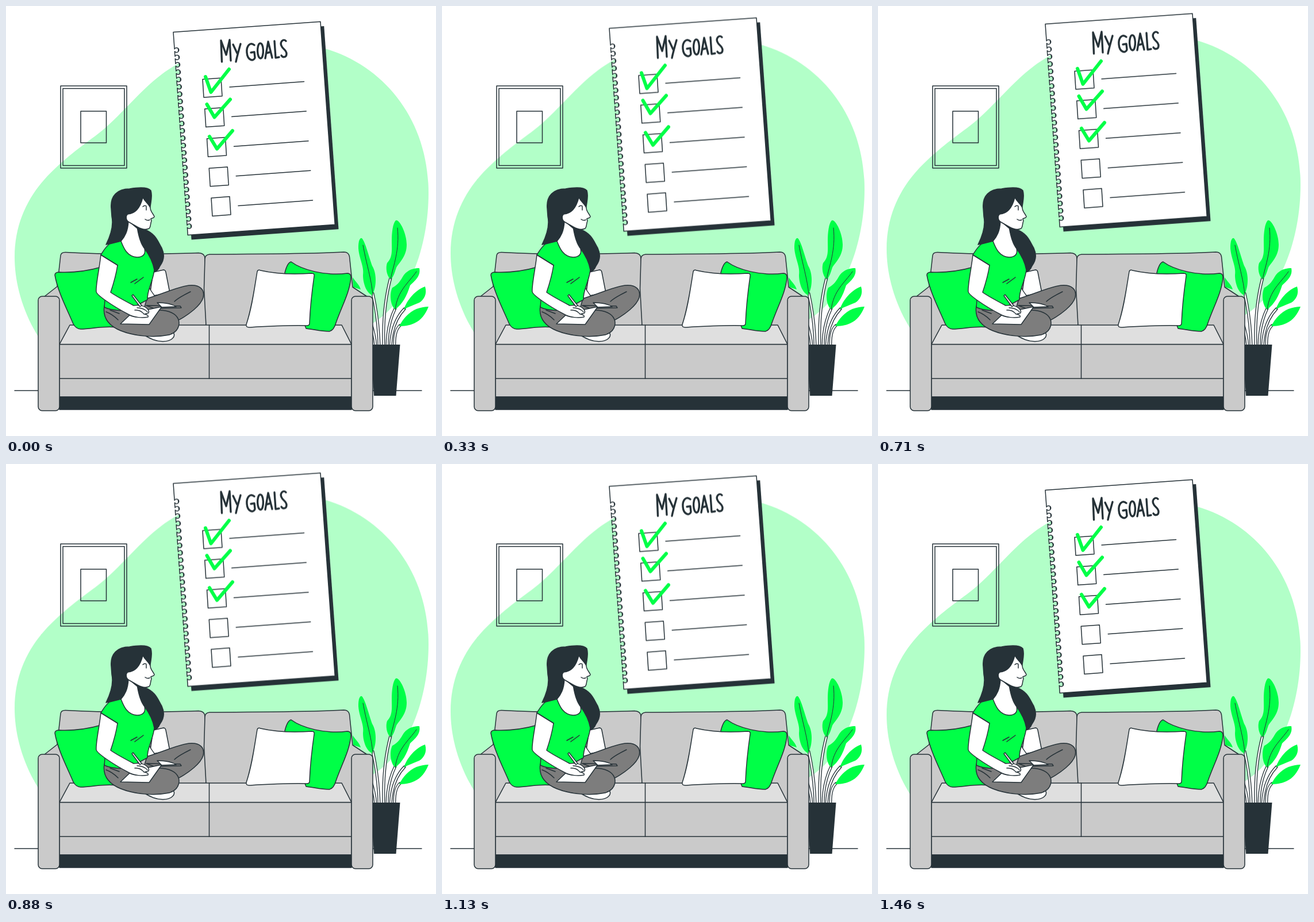
These frames come from a looping animation (748x748 px, 1500 ms). An HTML page:

```html
<!DOCTYPE html>
<html lang="en">
<head>
<meta charset="utf-8">
<title>My goals</title>
<style>
  html, body { margin: 0; width: 100%; height: 100%; overflow: hidden; background: #fff; }
  svg { display: block; width: 100vw; height: 100vh; }
  .ink { stroke: #263238; stroke-width: 1.5; stroke-linejoin: round; stroke-linecap: round; fill: none; }
  .dark { fill: #263238; }
  .white { fill: #fff; }
  .green { fill: #00ff47; }
  .sofa { fill: #cacaca; }
  .seat { fill: #dfdfdf; }
  .pants { fill: #7d7d7d; }
  .check { fill: none; stroke: #00ff47; stroke-width: 6; stroke-linecap: round; stroke-linejoin: round; }
  .letters { stroke-width: 3.4; }
  .leaf { fill: #00ff47; stroke: none; }
  .thin { stroke-width: 1; }
</style>
</head>
<body>
<svg viewBox="0 0 748 748">
  <path class="float" fill="#b2ffc8" d="M15 437C15 370 45 320 85 283C120 250 145 235 168 216C215 176 245 130 300 100C400 40 480 45 555 74C660 105 735 200 735 325C735 420 700 515 638 552L500 620H90C35 560 15 490 15 437Z"/>

  <g class="ink">
    <path d="M95 139H210V282H95ZM99 143.500H206V277.500H99ZM130 183H174.500V238H130Z"/>
    <path d="M15 669H723"/>
  </g>

  <g class="float">
    <g transform="translate(291 45.500) rotate(-4.1)">
      <path class="dark" d="M5.700 8.400h256.600v354H5.700z"/>
      <path id="page" class="ink white"/>
    </g>
    <g id="rows" class="ink"></g>
    <g class="check">
      <path d="M347 123L356.500 150L388 110"/>
      <path d="M349.500 171L362.500 193.500L390 162.500"/>
      <path d="M354 227L367 248.500L394 217"/>
    </g>
    <g class="ink letters" role="img" aria-label="My goals">
      <path d="M375.500 97L374 60L383 85L389 59L391 95"/>
      <path d="M395 67L402 82M408 66C405 77 402 87 400 97"/>
      <path d="M432 68C425 62 418 69 419 81C420 95 431 97 433 90L432 80L426 81"/>
      <path d="M441.500 65C449 63 449 89 443.500 91C436 92 436 67 441.500 65Z"/>
      <path d="M451 91L456 62L463 90M453 82L460 80"/>
      <path d="M467 61L469 90L475 89"/>
      <path d="M487 61C483 56 476 62 479 69C481 75 488 76 488 83C488 90 481 90 479 86"/>
    </g>
  </g>

  <g id="plant">
    <g id="stems"></g>
    <path class="leaf" d="M619 404C625 410 631 436 637 452C645 465 645 488 637 503C628 500 621 484 621 468C624 450 609 432 614 409Q616 403 619 404Z"/>
    <path class="leaf" d="M678 373C684 370 697 395 697 415C697 436 684 446 679 455C676 464 674 472 669 475C662 470 660 455 663 447C673 437 671 424 671 409C671 393 673 378 678 373Z"/>
    <path class="leaf" d="M719 456C722 470 711 478 703 486C697 505 690 518 677 528C668 520 667 500 672 490C682 485 686 478 692 468C700 458 710 456 719 456Z"/>
    <path class="leaf" d="M729 488C733 501 727 511 719 516C710 520 700 523 692 528C697 512 712 494 729 488Z"/>
    <path class="leaf" d="M735 523C730 536 722 547 710 552C702 556 692 557 684 557C690 545 700 533 714 527Q726 523 735 523Z"/>
    <path class="leaf" d="M603 472C608 480 615 485 617 493L604 489Z"/>
    <g class="ink thin">
      <path d="M621 416C627 450 636 475 638 503M681 386C685 425 674 450 669 475M714 462C700 482 681 495 677 528"/>
    </g>
    <path class="dark" d="M634 589H685.500L678.500 678H640Z"/>
  </g>

  <g class="ink">
    <path class="sofa" d="M66 506L89 488L95 434Q96 428 104 428.500C180 433 260 432 335 429.500Q345 430 346 438L348 556L340 588H93Z"/>
    <path class="sofa" d="M348 556L344.500 492L346 440Q346 433 354 432C430 431 510 432 588 428Q596 428 597.500 436L603 489L629 506L601 588Z"/>
    <path class="sofa" d="M93 588.500H601V680H93ZM93 648H601"/>
    <path class="seat" d="M111 555H584L601 588.500H93Z"/>
    <path d="M353.500 555V648"/>
    <path class="dark" d="M93 680H601V702H93Z"/>
    <rect class="sofa" x="56" y="505" width="37" height="199" rx="7"/>
    <rect class="sofa" x="601" y="505" width="37" height="199" rx="7"/>

    <path class="green" d="M85 468Q85 463 93 463C118 464 142 461 166 454L192 559C170 556 148 562 130 562Q122 562 117 553C106 527 90 497 85 468Z"/>
    <path class="green" d="M485 464C487 456 490 446 496 445C515 459 555 470 594 465Q600 465 600 472C598 498 585 520 574 551Q570 565 562 566C548 566 538 563 522 561Z"/>
    <path class="white" d="M437 462Q438 458 443 460C473 467 503 467 532 465Q537 465 536 470C532 498 529 525 528 552Q528 556 523 556C490 555 457 557 423 559Q417 559 418 554C428 524 432 492 437 462Z"/>
    <path class="white" d="M256 463L274 459Q277 459 278 463L285 499L250 505Z"/>
  </g>

  <g id="woman" class="ink">
    <path class="dark" d="M183 352C181 330 194 318 215 318C227 316 246 314 252 321C255 331 252 340 251 349L240 388C262 397 264 410 271 421C277 434 274 444 268 452Q264 462 256 463C247 450 234 425 229 392L215 390C210 400 205 406 200 410L174 415C184 395 187 380 184 366Z"/>
    <path class="white" d="M247 485C252 497 262 512 276 517L270 526C258 522 249 512 243 504Z"/>
    <path class="pants" d="M245 509C275 500 300 488 318 486C338 484 346 494 343 507C339 521 318 537 299 547L235 545Z"/>
    <path d="M321 497C309 503 300 507 293 514"/>
    <path class="white" d="M243 574C255 568 280 566 291 568C296 575 288 584 272 583.500C260 583 252 579 243 574Z"/>
    <path class="pants" d="M171 522C168 541 178 556 200 565C225 575 260 577 284 572C303 566 305 548 295 538C286 530 270 528 262 530L205 523Z"/>
    <path d="M174 532C182 535 189 540 195 546M181 529L197 535"/>
    <path class="green" d="M200 409L180 414C173 419 168 428 165 433L194 451L172 512L171 524C184 530 204 531 216 527L246 511C245 494 256 479 258 459C255 443 247 430 241 422L215 412Z"/>
    <path class="white" d="M213 374C212 392 207 401 200 409C205 422 211 436 228 437C240 437 243 430 241 422C236 416 231 402 228.500 387Z"/>
    <path class="white" d="M238 333C242 341 248 344 251 351C251 357 255 360 258 366C258 369 254 369 252 370L253 374C251 378 252 384 249 387C243 390 235 388 228 384L214 376C208 373 208 364 212 362C226 361 234 349 238 333Z"/>
    <path d="M244 349V355M238 349Q241 346 244 348M242 371Q246 374 250 372"/>
    <path d="M217 481L228 475M224 483L239 472"/>
    <path class="pants" d="M244 521L303 522L305 525L257 526Z"/>
    <path class="white" d="M199 553L219 534L271 523L249 554Z"/>
    <path class="white" d="M263 516C275 516 287 517 296 523L271 524Z"/>
    <path class="white" d="M165 433C162 460 156 485 157 497C158 503 184 521 214 537C222 542 238 543 247 541Q249 538 241 536L248 534Q250 530 244 525C239 521 231 520 222 521C205 512 190 504 182 498C188 480 192 465 194 451Z"/>
    <path d="M224 529Q234 528 240 536M228 525Q239 525 246 532"/>
    <path class="white" d="M219 504L221 502L236 521L233 523Z"/>
  </g>
</svg>
<script>
  const $ = id => document.getElementById(id);

  // Page outline with punched holes along the left edge
  let page = 'M0 0H256.600V354H0';
  for (let i = 24; i >= 0; i--) {
    page += `V${(33.500 + i * 12.800).toFixed(1)}a4 4 0 1 0 0-4`;
  }
  $('page').setAttribute('d', page + 'Z');

  // Five boxes, each with a ruled line
  let rows = '';
  for (let i = 0; i < 5; i++) {
    rows += `<path transform="translate(${i * 3.75} ${i * 51.6})"
      d="M342 127.500L374 125.200L376 156.700L344 159ZM389 141L518.500 131.500"/>`;
  }
  $('rows').innerHTML = rows;

  // Pale stems with dark edges
  const stems = [
    'M643 592Q641 560 622 520', 'M649 592Q648 545 638 500',
    'M657 592Q655 525 669 473', 'M663 592Q663 555 677 526',
    'M669 592Q671 550 693 527', 'M676 592Q675 565 685 556'
  ];
  $('stems').innerHTML = stems.map(d =>
    `<path class="ink" style="stroke-width:5" d="${d}"/>
     <path fill="none" stroke="#fff" stroke-width="2.4" d="${d}"/>`).join('');

  // Note and backdrop float up and back at a steady speed, 24 steps a second
  const steps = 36, loop = 1500, rise = 15, mid = (steps - 1) / 2;
  const frames = Array.from({ length: steps }, (_, k) => ({
    offset: Math.round(k * loop / steps / 10) * 10 / loop,
    transform: `translateY(${(Math.abs(k - mid) - mid) * rise * 2 / steps}px)`,
    easing: 'step-end'
  }));
  frames.push({ ...frames[steps - 1], offset: 1 });
  for (const el of document.querySelectorAll('.float')) {
    el.animate(frames, { duration: loop, iterations: Infinity });
  }
</script>
</body>
</html>
```
